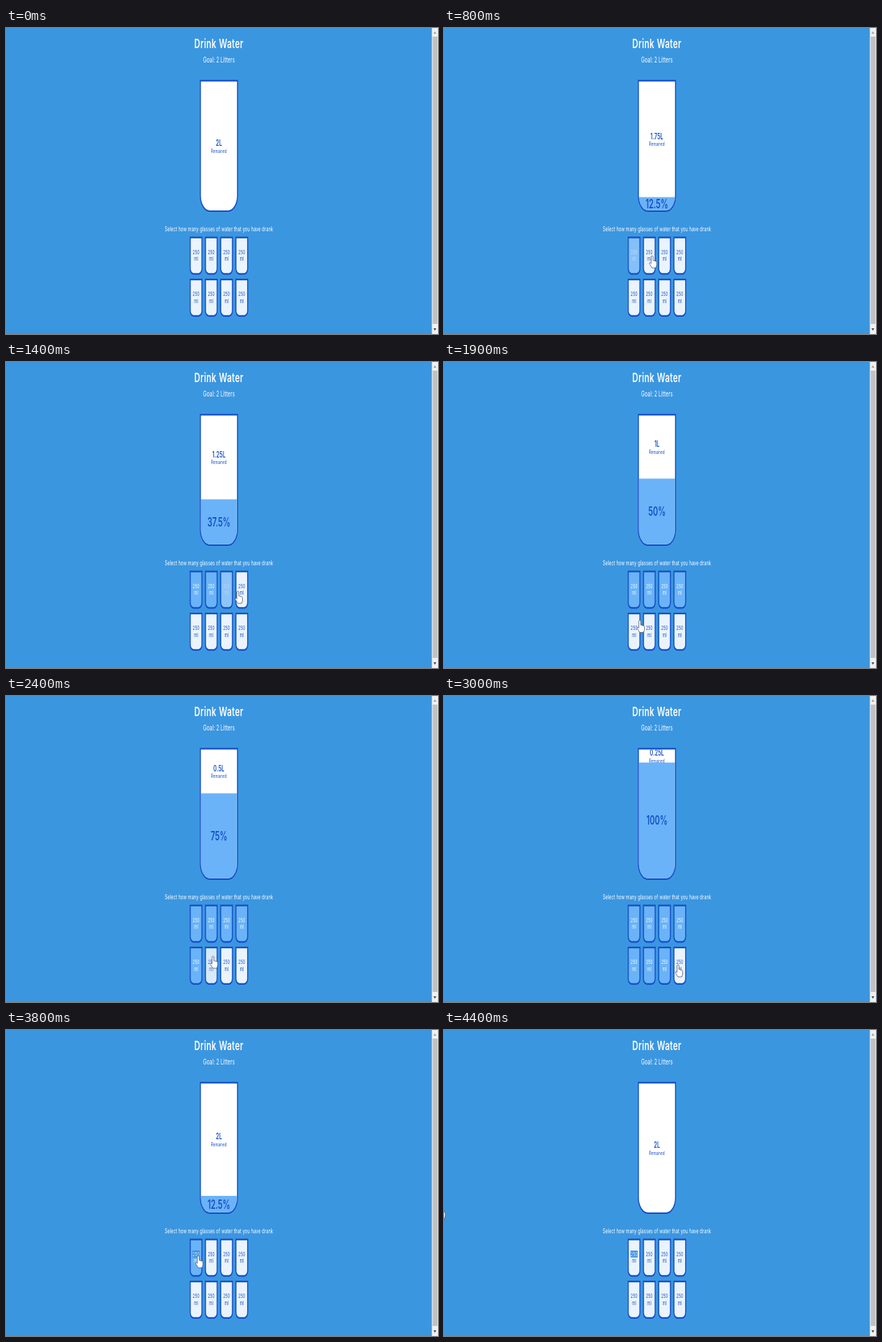
An HTML page for the animation above (5000 ms loop, 600 by 426 pixels).

```html
<!DOCTYPE html>
<html lang="en">
<head>
<meta charset="utf-8">
<title>Drink Water</title>
<style>
  html, body { margin: 0; width: 100%; height: 100%; overflow: hidden; background: #3b96e0; }
  svg { display: block; width: 600px; height: 426px; }
  text { font-family: Inter, "Open Sans", sans-serif; text-anchor: middle; white-space: pre; }
</style>
</head>
<body>
<svg id="stage" viewBox="0 0 600 426" xmlns="http://www.w3.org/2000/svg"></svg>
<script>
const LOOP = 5000, STEP = 100, TRANSITION = 300;
const INK = [20, 79, 198], WHITE = [255, 255, 255], WATER = [106, 179, 248], GLASS = [235, 244, 252];
const INNER_TOP = 4, INNER_HEIGHT = 322, SELECT_AT = 3800;

// [time, number of full glasses after the click]
const clicks = [[650, 1], [990, 2], [1270, 3], [1650, 4], [2020, 5],
                [2360, 6], [2680, 7], [2990, 8], [3495, 1], [3800, 0]];

// [time, x, y] of the fingertip
const pointer = [[600, 265, 318], [680, 268, 318], [800, 289, 317], [1000, 289, 318],
                 [1180, 307, 319], [1280, 308, 319], [1400, 322, 319], [1700, 323, 320],
                 [1950, 266, 364], [2100, 267, 364], [2360, 287, 362], [2440, 288, 362],
                 [2640, 307, 364], [2720, 308, 366], [2940, 325, 374], [3050, 325, 374],
                 [3400, 267, 314], [4100, 267, 314], [4400, -4.7, 246]];

const stage = document.getElementById('stage');

function add(parent, tag, attrs, content = '') {
  const node = document.createElementNS('http://www.w3.org/2000/svg', tag);
  for (const key in attrs) node.setAttribute(key, attrs[key]);
  node.textContent = content;
  parent.appendChild(node);
  return node;
}

const rgb = c => `rgb(${c.map(Math.round).join()})`;
const lerp = (a, b, k) => a + (b - a) * k;
const mix = (a, b, k) => rgb(a.map((v, i) => lerp(v, b[i], k)));

function label(parent, x, y, size, content, fill, weight = 400, spacing = 0.015) {
  return add(parent, 'text', {
    x, y, fill, 'font-size': size, 'font-weight': weight, 'letter-spacing': spacing * size
  }, content);
}

function cupPath(x, y, w, h, r) {
  return `M${x},${y}h${w}v${h - r}a${r},${r} 0 0 1 ${-r},${r}h${2 * r - w}a${r},${r} 0 0 1 ${-r},${-r}z`;
}

// CSS "ease": cubic-bezier(.25, .1, .25, 1)
function ease(x) {
  if (x <= 0) return 0;
  if (x >= 1) return 1;
  const curve = (a, b, s) => 3 * a * s * (1 - s) ** 2 + 3 * b * s * s * (1 - s) + s ** 3;
  let lo = 0, hi = 1;
  for (let i = 0; i < 24; i++) {
    const mid = (lo + hi) / 2;
    if (curve(0.25, 0.25, mid) < x) lo = mid; else hi = mid;
  }
  return curve(0.1, 1, lo);
}

function buildScrollbar() {
  add(stage, 'rect', { x: 591.5, y: 0, width: 8.5, height: 426, fill: '#f1f1f1' });
  add(stage, 'rect', { x: 592.6, y: 12, width: 6.6, height: 400, fill: '#c1c1c1' });
  add(stage, 'path', { d: 'M593.7,8l2-3.4 2,3.4z', fill: '#a3a3a3' });
  add(stage, 'path', { d: 'M593.7,418l2,3.4 2-3.4z', fill: '#505050' });
}

function buildSmallCup(page, index) {
  const x = (index % 4 - 1.5) * 60, y = 391.7 + Math.floor(index / 4) * 105;
  const body = add(page, 'path', {
    d: cupPath(x - 23, y + 2, 46, 91, 13), stroke: rgb(INK), 'stroke-width': 4
  });
  const mark = index === 0
    ? add(page, 'rect', { x: x - 14, y: y + 30, width: 28, height: 17, fill: '#318ee2' })
    : null;
  const amount = label(page, x, y + 44, 14, '250', rgb(INK));
  const unit = label(page, x, y + 61, 14, 'ml', rgb(INK));
  return { body, mark, amount, unit };
}

add(stage, 'rect', { width: 600, height: 426, fill: '#3b96e0' });
buildScrollbar();

// The page is shown squeezed: origin at the top centre of the big cup
const page = add(stage, 'g', { transform: 'translate(295.75 72.3) scale(.353 .557)' });
label(page, 0, -80, 32, 'Drink Water', '#fff', 600, 0.034);
label(page, 0, -43.6, 18.72, 'Goal: 2 Litters', '#fff', 400, 0.008);
label(page, 0, 378, 16, 'Select how many glasses of water that you have drank', '#fff', 400, 0.018);

const clip = add(page, 'clipPath', { id: 'inside' });
add(clip, 'path', { d: cupPath(-71, 4, 142, 322, 36) });
add(page, 'path', { d: cupPath(-73, 2, 146, 326, 38), fill: '#fff' });
const inside = add(page, 'g', { 'clip-path': 'url(#inside)' });
const litres = label(inside, 0, 0, 20, '', rgb(INK), 600);
const remained = label(inside, 0, 0, 12.8, 'Remained', rgb(INK), 400, 0.02);
const water = add(inside, 'rect', { x: -75, width: 150, fill: rgb(WATER) });
const percent = label(inside, 0, 0, 30, '', rgb(INK), 600, 0);
add(page, 'path', {
  d: cupPath(-73, 2, 146, 326, 38), fill: 'none', stroke: rgb(INK), 'stroke-width': 4
});

const cups = Array.from({ length: 8 }, (_, i) => buildSmallCup(page, i));

const hand = add(stage, 'path', {
  d: 'M-1.3,1q1.3-2 2.6,0v5.6l3.8,1q1.4,.4 1.4,2v3.4l-1.2,4h-5.4l-3.4-5.6q-.6-2 .9-1.7l1.3,1.2z',
  fill: '#fff', stroke: '#3c4658', 'stroke-width': 0.7, 'stroke-linejoin': 'round'
});

function levelAt(t) {
  let from = 0, to = 0, k = 1;
  for (const [time, count] of clicks) {
    if (t < time) break;
    from = to;
    to = count;
    k = ease((t - time) / TRANSITION);
  }
  return { from, to, k };
}

function drawBigCup({ from, to, k }) {
  const height = Math.min(INNER_HEIGHT, lerp(from, to, k) / 8 * 330);
  const top = INNER_TOP + INNER_HEIGHT - height;
  const middle = (INNER_TOP + top) / 2;
  const shown = to || (k < 1 ? from : 0);
  litres.textContent = `${2 - Math.min(to, 7) * 0.25}L`;
  litres.setAttribute('y', middle - 0.5);
  remained.setAttribute('y', middle + 17);
  water.setAttribute('y', top);
  water.setAttribute('height', height);
  percent.textContent = shown ? `${shown * 12.5}%` : '';
  percent.setAttribute('y', top + height / 2 + 11);
}

function drawSmallCups({ from, to, k }, selected) {
  cups.forEach(({ body, mark, amount, unit }, i) => {
    const fullness = lerp(i < from ? 1 : 0, i < to ? 1 : 0, k);
    const ink = mix(INK, WHITE, fullness);
    body.setAttribute('fill', mix(GLASS, WATER, fullness));
    amount.setAttribute('fill', mark && selected ? '#fff' : ink);
    unit.setAttribute('fill', ink);
    if (mark) mark.setAttribute('visibility', selected ? 'visible' : 'hidden');
  });
}

function drawPointer(t) {
  hand.setAttribute('visibility', t < pointer[0][0] ? 'hidden' : 'visible');
  const next = pointer.findIndex(p => p[0] > t);
  const b = pointer.at(next), a = next > 0 ? pointer[next - 1] : b;
  const s = a === b ? 0 : (t - a[0]) / (b[0] - a[0]);
  const k = s * s * (3 - 2 * s);
  hand.setAttribute('transform', `translate(${lerp(a[1], b[1], k)} ${lerp(a[2], b[2], k)})`);
}

function draw(time) {
  const t = Math.floor(time % LOOP / STEP) * STEP;
  const level = levelAt(t);
  drawBigCup(level);
  drawSmallCups(level, t >= SELECT_AT);
  drawPointer(t);
}

const start = performance.now();
function tick() {
  draw(performance.now() - start);
  requestAnimationFrame(tick);
}
tick();
</script>
</body>
</html>
```
